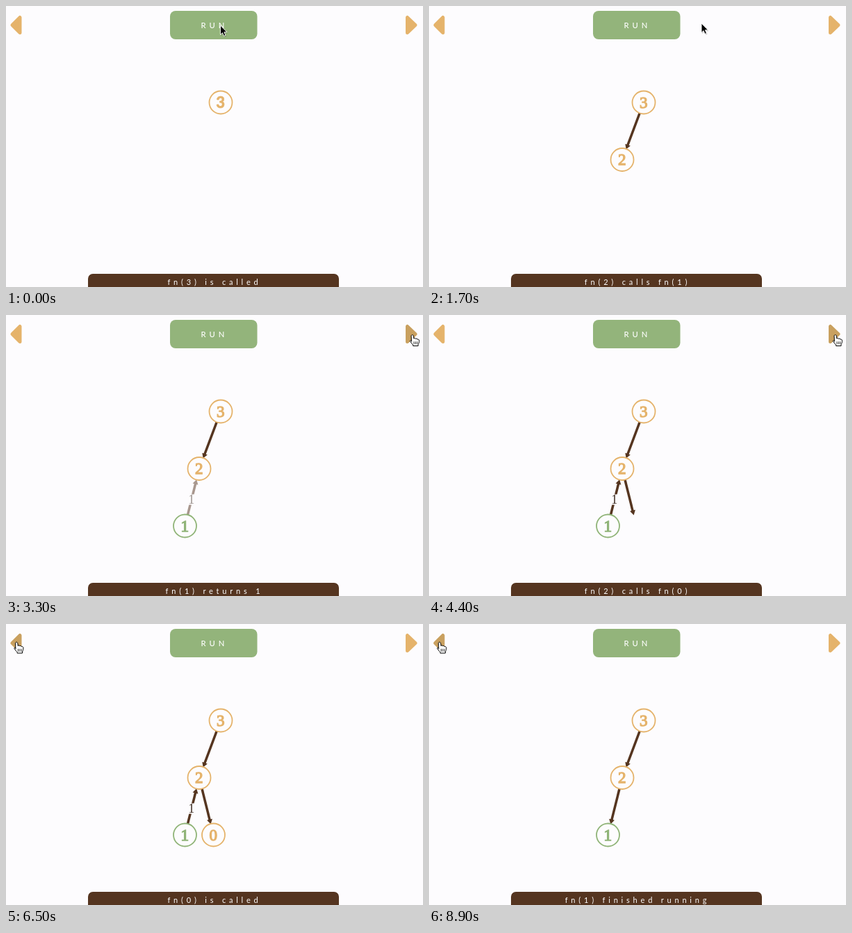
Recreate the animation shown at these times as an HTML page. Size 600 px wide and 405 px high, loop 9.7 s.

```html
<!DOCTYPE html>
<html lang="en">
<head>
<meta charset="utf-8">
<title>Recursion tree</title>
<style>
  html, body { margin: 0; width: 100%; height: 100%; overflow: hidden; background: #fdfcfe; }
  svg { display: block; width: 600px; height: 405px; }
  .ui { font: 11px Lato, sans-serif; letter-spacing: 4.8px; fill: #fff; text-anchor: middle; white-space: pre; }
  .run { font-size: 11.2px; font-weight: 500; letter-spacing: 5px; }
  .num { font: 23px "Liberation Serif", serif; text-anchor: middle; stroke-width: 1.3; }
  .num.plain { font: 800 22px Lato, sans-serif; stroke-width: .6; }
  .side { stroke-width: 5; stroke-linejoin: round; }
</style>
</head>
<body>
<svg id="stage" viewBox="0 0 600 405">
  <rect width="600" height="405" fill="#fdfcfe"/>
  <path id="prev" class="side" d="M9 27.5L20 16.5V38.5Z"/>
  <path id="next" class="side" d="M589 27.5L577.5 16.5V38.5Z"/>
  <rect x="236" y="7" width="125.5" height="41" rx="8" fill="#93b47b"/>
  <text class="ui run" x="300" y="31.7">RUN</text>
  <g id="tree"></g>
  <rect x="118" y="386" width="361" height="40" rx="7" fill="#553520"/>
  <text id="log" class="ui" x="300" y="402.3"></text>
  <g id="arrow">
    <path d="M.5 1V14.2L3.6 11.3L5.6 16L8 15L6 10.4H10Z" fill="#000" opacity=".18" transform="translate(.6 .8)"/>
    <path d="M0 0V13.4L3 10.6L5 15.3L7.4 14.3L5.4 9.7H9.5Z" fill="#000" stroke="#fff" stroke-width=".9"/>
  </g>
  <g id="hand" stroke="#000" stroke-width="1" stroke-linejoin="round" stroke-linecap="round">
    <path fill="#fff" d="M-1.6 9.6L-2 1.8C-2 -.3 1 -.4 1.3 1.6L1.8 5.6C2.4 4.3 4.3 4.6 4.5 6C5.2 5 6.9 5.4 7.1 6.8C8 6.1 9.4 6.8 9.4 8.2C9.5 11 8.9 12.3 8 14V16H.6V14.6C-.8 13.4 -2 11.5 -3.4 9.6C-4.2 8.2 -2.6 7.4 -1.6 8.8"/>
    <path fill="none" stroke-width=".8" d="M2 10.2V13.3M4.3 10.2V13.3M6.6 10.2V13.3"/>
  </g>
</svg>
<script>
const LOOP = 9700, TICK = 100, FADE = 200;
const GOLD = [229, 179, 107], DARK = [201, 160, 95], GREEN = [144, 180, 120], BROWN = '#553520';
const $ = id => document.getElementById(id);
const rgb = c => `rgb(${c.map(Math.round)})`;
const mix = (a, b, k) => a.map((v, i) => v + (b[i] - v) * k);

function add(parent, tag, attrs, text = '') {
  const el = document.createElementNS('http://www.w3.org/2000/svg', tag);
  for (const k in attrs) el.setAttribute(k, attrs[k]);
  el.textContent = text;
  return parent.appendChild(el);
}

const log = [
  [0, 'fn(3) is called'], [600, 'fn(3) calls fn(2)'], [1100, 'fn(2) is called'],
  [1700, 'fn(2) calls fn(1)'], [2200, 'fn(1) is called'], [2600, 'fn(1) finished running'],
  [3200, 'fn(1) returns 1'], [4200, 'fn(2) calls fn(0)'], [5100, 'fn(0) is called'],
  [6800, 'fn(2) calls fn(0)'], [7600, 'fn(1) returns 1'], [8300, 'fn(1) finished running']
];

// time, x, y of the pointer tip
const path = [
  [0, 308.5, 28], [100, 308.5, 28], [1000, 318, 27], [1500, 318, 27], [1700, 392, 25],
  [2100, 540, 22], [2400, 585.5, 28.5], [3400, 585, 28.5], [5500, 585, 28.5],
  [5800, 63, 50], [6100, 24, 34], [6400, 15.5, 26], [LOOP, 15.5, 26]
];

const pos = { 3: [309, 139], 2: [278, 221.5], 1: [257.5, 304], 0: [298.5, 304] };
const R = 16.5;
const parts = [];
const show = (el, ...spans) => parts.push({ el, spans });
const group = () => add($('tree'), 'g', {});

function edge(from, to, label, ...spans) {
  const g = group(), [x1, y1] = pos[from], [x2, y2] = pos[to];
  const d = Math.hypot(x2 - x1, y2 - y1), ang = Math.atan2(y2 - y1, x2 - x1) * 180 / Math.PI;
  const tip = d - R + .6;
  const shaft = add(g, 'g', { transform: `translate(${x1} ${y1}) rotate(${ang})` });
  add(shaft, 'path', { d: `M${R} 0H${tip - 5}`, stroke: BROWN, 'stroke-width': 3.5 });
  add(shaft, 'path', { d: `M${tip} 0L${tip - 7} -4V4Z`, fill: BROWN });
  if (label) {
    add(g, 'rect', { x: 260, y: 258.5, width: 14, height: 15, fill: '#fdfcfe' });
    add(g, 'text', { x: 266.8, y: 272, 'text-anchor': 'middle', fill: '#3c2a20',
      style: 'font:18px "Liberation Serif",serif' }, label);
  }
  show(g, ...spans);
}

function node(n, ...spans) {
  const g = group(), [cx, cy] = pos[n];
  add(g, 'circle', { cx, cy, r: R, fill: '#fdfcfe', 'stroke-width': 1.8 });
  add(g, 'text', { class: 'num', x: cx - .3, y: cy + 7.8, stroke: 'inherit' }, n);
  tint(g, GOLD);
  show(g, ...spans);
  return g;
}

function tint(g, c) {
  g.setAttribute('stroke', rgb(c));
  g.lastChild.setAttribute('fill', rgb(c));
}

edge(3, 2, '', [600, LOOP]);
edge(2, 1, '', [1700, 3200], [8300, LOOP]);
edge(1, 2, '1', [3200, 8300]);
edge(2, 0, '', [4200, 7600]);
const root = node(3, [-FADE, LOOP]);
node(2, [1100, LOOP]);
const leaf = node(1, [2200, LOOP]);
node(0, [5100, 6800]);

const ramp = (t, start) => Math.max(0, Math.min(1, (t - start) / FADE));

function pointer(t) {
  const i = path.findIndex(p => p[0] > t);
  const [t0, x0, y0] = path[i - 1], [t1, x1, y1] = path[i];
  const k = (t - t0) / (t1 - t0);
  return [x0 + (x1 - x0) * k, y0 + (y1 - y0) * k];
}

function draw(t) {
  for (const { el, spans } of parts) {
    const s = spans.find(([a, b]) => t >= a && t < b);
    el.setAttribute('opacity', s ? ramp(t, s[0]) : 0);
  }
  tint(leaf, mix(GOLD, GREEN, ramp(t, 2600)));
  root.lastChild.setAttribute('class', t < 600 ? 'num plain' : 'num');
  $('log').textContent = log.filter(s => s[0] <= t).pop()[1];

  const [x, y] = pointer(t);
  const level = y > 14 && y < 41;
  const onPrev = level && x < 23, onNext = level && x > 575;
  for (const [id, on] of [['prev', onPrev], ['next', onNext]]) {
    const c = rgb(on ? DARK : GOLD);
    $(id).setAttribute('fill', c);
    $(id).setAttribute('stroke', c);
  }
  const over = onPrev || onNext;
  for (const id of ['arrow', 'hand']) {
    $(id).setAttribute('transform', `translate(${x} ${y})`);
    $(id).setAttribute('visibility', (id === 'hand') === over ? 'visible' : 'hidden');
  }
}

const begin = performance.now();
function loop() {
  const t = (performance.now() - begin) % LOOP;
  draw(Math.floor(t / TICK) * TICK);
  requestAnimationFrame(loop);
}
loop();
</script>
</body>
</html>
```
